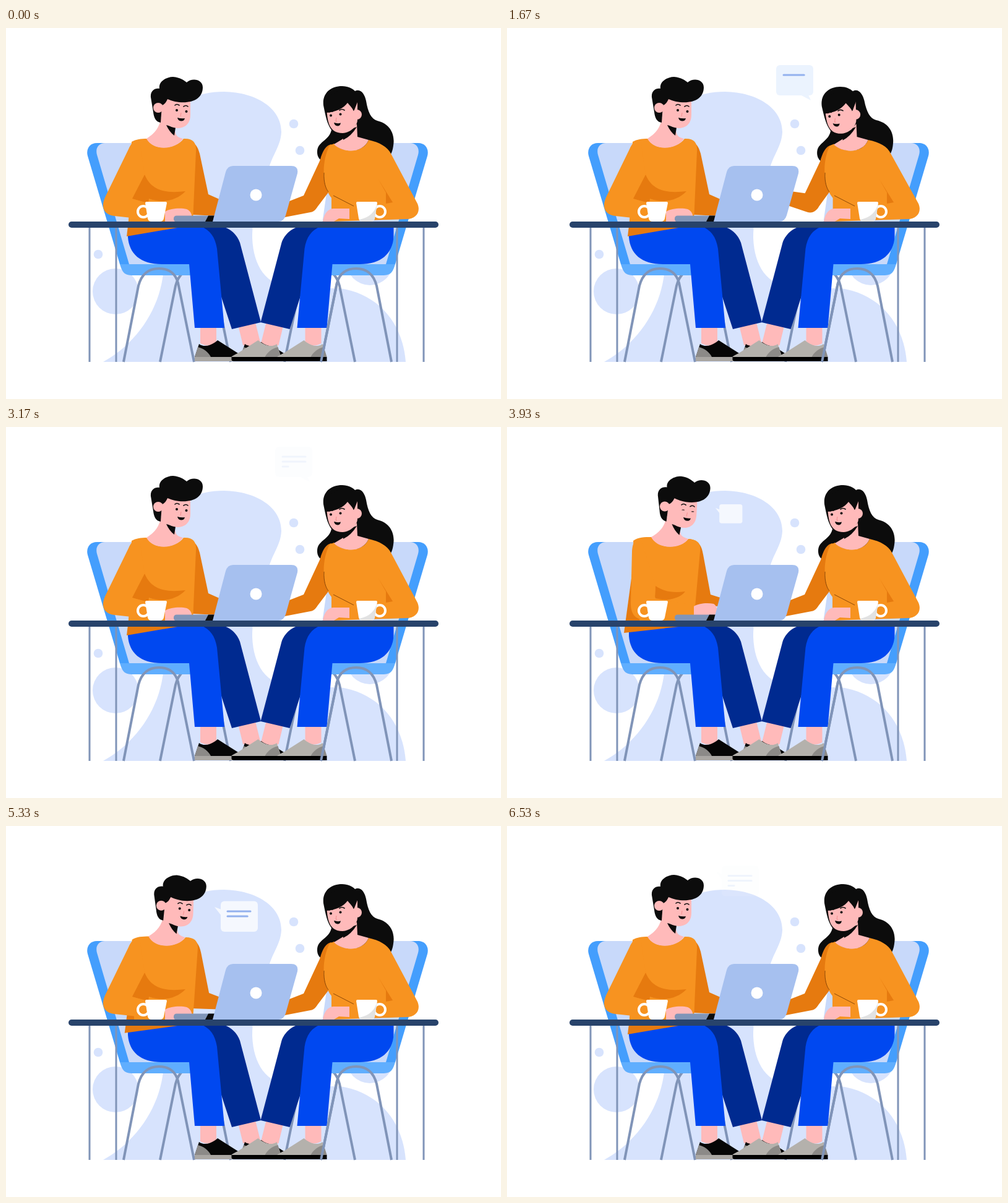
Recreate the animation shown at these times as an HTML page. Size 800x600 px, loop 7.66 s.

```html
<!DOCTYPE html>
<html lang="en">
<head>
<meta charset="utf-8">
<title>Two colleagues talking at a desk</title>
<style>
html, body { margin: 0; width: 100%; height: 100%; overflow: hidden; background: #fff; }
svg { display: block; width: 100%; height: 100%; }
.pale { fill: #d7e3fd; }
.skin { fill: #ffbaba; }
.ink { fill: #0c0c0c; }
.top { fill: #f79320; }
.shade { fill: #e67a0f; }
.metal { fill: none; stroke: #8094b8; stroke-width: 4; }
.brow { fill: none; stroke: #0c0c0c; stroke-width: 1.6; stroke-linecap: round; }
.nose { fill: none; stroke: #f28f8f; stroke-width: 1; }
.text path { fill: none; stroke: #93b1ee; stroke-width: 3; stroke-linecap: round; }
.dark { --upper: #060606; --heel: #8c8a88; --sole: #aaa7a3; }
.light { --upper: #b4b1ac; --heel: #8c8a87; --sole: #000; }
</style>
</head>
<body>
<svg viewBox="0 0 800 600">
  <defs>
    <g id="chair">
      <path class="metal" d="M249 540L274 417C279 398 290 389 307 389C324 389 333 398 337 412L363 540"/>
      <path fill="#449efd" d="M165 186H147C135 186 129 196 132 207L184 382H205V186Z"/>
      <path fill="#c8d9fa" d="M160 186H272C282 186 284 196 286 205L304 330V382H199L147 205C144 194 150 186 160 186Z"/>
      <path fill="#60aefe" d="M184 382H312V400H205C191 400 188 395 184 382Z"/>
      <path class="metal" d="M190 540L214 417C219 398 230 389 247 389C264 389 274 398 278 412L304 540"/>
    </g>
    <g id="legs">
      <path class="skin" d="M374 476L402 472L411 508Q398 518 383 513Z"/>
      <path class="skin" d="M314 480H340V508Q328 518 314 510Z"/>
      <path fill="#002a90" d="M312 320H345C364 323 374 336 378 347L412 476L365 487L347 432L336 345Z"/>
      <path fill="#0048f0" d="M197 320V338C199 365 217 382 252 382H296L305 485H353L341 357C338 338 330 327 315 321Z"/>
    </g>
    <g id="shoe">
      <path fill="var(--upper)" d="M312 511C320 517 332 514 342 505L375 526C381 529 385 531 385 532H305Z"/>
      <path fill="var(--heel)" d="M305 532L310 516C319 518 327 524 331 532Z"/>
      <path fill="var(--sole)" d="M305 532H385V536Q385 539 381 539H305Z"/>
    </g>
  </defs>

  <g class="pale">
    <path d="M157 540C220 505 255 440 255 380V160C270 120 310 103 352 103C405 104 445 130 445 168C444 194 427 207 422 240C412 280 398 295 398 340C400 385 420 415 460 421H540C600 430 641 475 646 540Z"/>
    <circle cx="465" cy="155" r="7.3"/><circle cx="475" cy="198" r="7.3"/>
    <circle cx="149" cy="366" r="7.3"/><circle cx="177" cy="426" r="37"/>
    <circle cx="588" cy="378" r="38"/>
  </g>

  <use href="#chair"/>
  <use href="#chair" transform="matrix(-1 0 0 1 813 0)"/>
  <use href="#legs"/>
  <g class="dark"><use href="#shoe" x="74"/><use href="#shoe"/></g>
  <use href="#legs" transform="matrix(-1 0 0 1 823.5 0)"/>
  <g class="light" transform="matrix(-1 0 0 1 823.5 0)"><use href="#shoe" x="74"/><use href="#shoe"/></g>
  <path class="metal" d="M509 540L535 412"/>

  <!-- man -->
  <path id="manSleeve" class="shade"/>
  <path id="manHem" class="shade"/>
  <path id="manBody" class="top"/>
  <path id="manFold" class="shade"/>
  <path id="manArm" class="top"/>
  <path id="manNeck" class="skin"/>
  <path id="manHand" class="skin"/>
  <g id="manHead">
    <path class="ink" d="M259 157L274 161L272 174Q264 168 259 157Z"/>
    <path class="skin" d="M248 112H298V140C298 156 288 162 277 162C262 161 251 150 248 138Z"/>
    <path class="ink" d="M234 112C233 102 240 97 248 98C246 86 260 79 270 79C282 80 288 85 292 88C301 80 318 83 318 96C318 113 303 122 280 120C270 119 264 116 261 115C258 122 255 124 252 125L250 153C242 152 239 145 238 136Z"/>
    <circle class="skin" cx="246" cy="129" r="8"/>
    <path class="brow" d="M273 125Q276 122 280 125M287 127Q291 124 294 127"/>
    <ellipse class="ink eye" cx="276" cy="133"/><ellipse class="ink eye" cx="291.5" cy="135"/>
    <path class="nose" d="M283 137L282 143"/>
    <path class="ink" d="M277 145Q283 147 289 146Q288 150.500 283 150.500Q278 150 277 145Z"/>
  </g>

  <!-- woman -->
  <g class="womanTilt">
    <path class="ink" d="M513 125C511 105 525 94 543 94C553 94 560 98 564 102C573 97 580 107 582 118C585 136 590 147 600 150C621 155 629 172 626 190C625 198 623 203 620 207L580 197H540L510 214C502 210 501 197 506 190C513 181 523 178 526 165C519 155 517 145 513 125Z"/>
  </g>
  <path id="womanSleeve" class="shade"/>
  <path id="womanBody" class="top"/>
  <path class="shade" d="M602 245L625 282L614 284V266Z"/>
  <path fill="none" stroke="#8f4a08" stroke-width="1" d="M514 234C513 250 517 260 521 265M529 271L562 288"/>
  <path class="skin" d="M512 313C514 300 520 292 530 292H555V309L538 308L530 313Z"/>
  <path id="womanNeck" class="skin"/>
  <g class="womanTilt">
    <path class="ink" d="M567 160L545 167V181Q558 175 567 160Z"/>
    <path class="skin" d="M518 125C519 150 521 170 544 170C558 169 568 158 568 148V115H518Z"/>
    <path class="ink" d="M517 137C534 136 545 130 552 121C556 126 560 129 562 135L572 110L545 96L514 115Z"/>
    <circle class="skin" cx="567" cy="140" r="8"/>
    <path class="brow" d="M539 133Q543 130 547 133M522 136Q525 134 528 135"/>
    <circle class="ink" cx="525" cy="141.500" r="2"/><circle class="ink" cx="540.500" cy="139.500" r="2"/>
    <path class="nose" d="M534 145L533 151H535"/>
    <path class="ink" d="M530 153Q536 155 541 153.500Q540 158.500 536 158.500Q531 158 530 153Z"/>
  </g>

  <!-- desk -->
  <rect x="271" y="303.500" width="87" height="10" rx="4.500" fill="#8095b8"/>
  <path class="ink" d="M322 313L327 303.500H340V313Z"/>
  <path fill="#a6c0ef" d="M367 223H461Q473 223 471 235L452 303Q449 313 440 313H334L355 233Q358 223 367 223Z"/>
  <circle cx="404" cy="270" r="9.500" fill="#fff"/>
  <g fill="none" stroke="#fff" stroke-width="4">
    <circle cx="222" cy="297" r="9"/><circle cx="604" cy="297" r="9"/>
  </g>
  <path fill="#fff" d="M227 281H258Q260 281 260 283L255 308Q254 313 249 313H235Q230 313 229 308L225 283Q225 281 227 281ZM568 281H598Q600 281 600 283L596 308Q595 313 590 313H576Q571 313 570 308L566 283Q566 281 568 281Z"/>
  <path fill="#e2e2e2" d="M600 284L596 308Q595 313 590 313H576Q572 313 571 310C588 306 596 298 600 284Z"/>
  <path class="metal" style="stroke-width:3" d="M135 322V540M178 322V540M632 322V540M675 322V540"/>
  <rect x="101" y="313" width="598" height="10" rx="5" fill="#28436b"/>

  <g id="womanBubble">
    <path fill="#ebf3fe" d="M474 108L491 117L487 108Z"/>
    <rect x="435" y="60" width="60" height="49" rx="6" fill="#ebf3fe"/>
    <g class="text"></g>
  </g>
  <g id="manBubble">
    <path fill="#f5f8fe" d="M337 131L348 135V145Z"/>
    <rect x="347" y="121.500" width="60" height="49.500" rx="6" fill="#f5f8fe"/>
    <g class="text"></g>
  </g>
</svg>
<script>
const LOOP = 7660, TALK = 3370;
const $ = id => document.getElementById(id);
const ramp = (t, a, b) => Math.min(1, Math.max(0, (t - a) / (b - a)));
const ease = (t, a, b) => { const x = ramp(t, a, b); return x * x * (3 - 2 * x); };

// Rest and active outlines share the same commands, so their numbers can be blended.
const NUM = /-?\d+(\.\d+)?/g;
const blend = (a, b, k) => {
  const to = b.match(NUM);
  let i = 0;
  return a.replace(NUM, n => (+n + (to[i++] - n) * k).toFixed(2));
};
const shapes = {
  manSleeve: ["M288 180C305 182 310 192 313 203L327 269L345 277L343 304L300 302Z",
              "M294 181C311 183 315 194 317 206L329 271L345 276L343 290L300 289Z"],
  manHem: ["M203 270L195 337L277 323L300 313Z", "M203 230L189 333L277 323L300 313Z"],
  manBody: ["M228 179C238 200 275 196 287 179C303 178 308 186 307 200L302 313L285 320L198 320L203 184C210 180 218 179 228 179Z",
            "M234 178C244 199 281 197 293 181C309 182 314 189 312 202L302 313L285 320L215 320L204 184C212 178 222 178 234 178Z"],
  manFold: ["M224 237L203 276L230 283L231 276C253 284 276 279 290 264C262 267 236 266 224 237Z",
            "M240 257L239 274L240 277L241 278C260 282 280 277 288 266C272 268 256 268 240 257Z"],
  manArm: ["M216 181C206 182 202 187 198 196L160 274C153 290 158 302 175 304L258 313L258 294L204 276L224 237Z",
           "M216 180C206 182 203 187 202 202L200 285C200 301 206 311 222 312L303 313L303 288L239 277L240 257Z"],
  manNeck: ["M250 145C249 160 240 171 227 179C238 200 275 197 286 179C276 176 272 174 273 155Z",
            "M257 145C256 160 247 170 233 178C244 199 281 198 293 181C281 177 278 175 281 157Z"],
  manHand: ["M257 297C266 291 284 291 292 293C299 296 302 303 300 313L257 313Z",
            "M302 290C310 285 324 284 334 286C339 289 341 296 340 313L302 313Z"],
  womanSleeve: ["M526 188C514 190 510 206 507 215L481 271L440 287L440 308L492 298C499 297 502 291 505 287L524 262Z",
                "M524 190C512 192 508 208 505 217L482 265L450 247L444 268L480 297C490 303 499 299 504 289L523 262Z"],
  womanBody: ["M530 187C545 203 577 203 586 181C604 185 616 192 622 203L665 284C671 298 662 309 648 309L526 313L526 275C510 255 510 215 523 190Z",
              "M527 188C542 203 574 203 582 181C602 185 614 191 619 203L665 284C671 298 662 309 648 309L527 313L527 275C510 255 509 215 521 191Z"],
  womanNeck: ["M567 155L568 176L586 181C577 203 545 203 530 188L545 179Z",
              "M563 155L564 176L582 181C574 203 542 203 527 189L541 180Z"]
};
const pose = (ids, k) => ids.split(" ").forEach(id => $(id).setAttribute("d", blend(...shapes[id], k)));

function bubble(id, t, tipX, tipY, textX, textY, rise) {
  const el = $(id), up = ramp(t, 2660, 3165);
  const size = t < 780 ? 1.23 * Math.sin(ramp(t, 450, 780) * Math.PI / 2) : 1.23 - 0.23 * ease(t, 780, 1100);
  el.setAttribute("transform", `translate(${tipX} ${tipY - rise * up}) scale(${size}) translate(${-tipX} ${-tipY})`);
  el.setAttribute("opacity", 1 - 0.87 * up);
  const lines = [[37, 1420, 1700], [37, 1700, 2000], [9, 2000, 2150]].map(([w, a, b], i) => {
    const k = ramp(t, a, b);
    return k ? `<path d="M${textX} ${textY + i * 8}h${w * k}"/>` : "";
  });
  el.querySelector(".text").innerHTML = lines.join("");
}

function draw(t) {
  const woman = ease(t, 0, 750) - ease(t, 1000, 2600);
  pose("womanSleeve womanBody womanNeck", woman);
  document.querySelectorAll(".womanTilt").forEach(g =>
    g.setAttribute("transform", `translate(${-3.5 * woman} ${woman}) rotate(${-3 * woman} 550 190)`));

  const lean = ease(t, TALK, 3950) - ease(t, 4950, 5760);
  const reach = ease(t, 3400, 3900) - ease(t, 4950, 5320);
  pose("manSleeve manHem manBody manNeck", lean);
  pose("manFold manArm manHand", reach);
  $("manHead").setAttribute("transform", `translate(${6 * lean} 0) rotate(${3 * lean} 258 185)`);

  const blink = Math.max(ramp(t, 3840, 3910) - ramp(t, 3950, 4030), ramp(t, 5760, 5810) - ramp(t, 5830, 5875));
  document.querySelectorAll(".eye").forEach(e => {
    e.setAttribute("rx", 2 + 0.5 * blink);
    e.setAttribute("ry", 2 - 1.4 * blink);
  });

  bubble("womanBubble", t < TALK ? t : 0, 491, 117, 447, 76, 28);
  bubble("manBubble", t - TALK, 337, 131, 358, 138, 58);
}

const start = performance.now();
function tick() {
  draw((performance.now() - start) % LOOP);
  requestAnimationFrame(tick);
}
tick();
</script>
</body>
</html>
```
